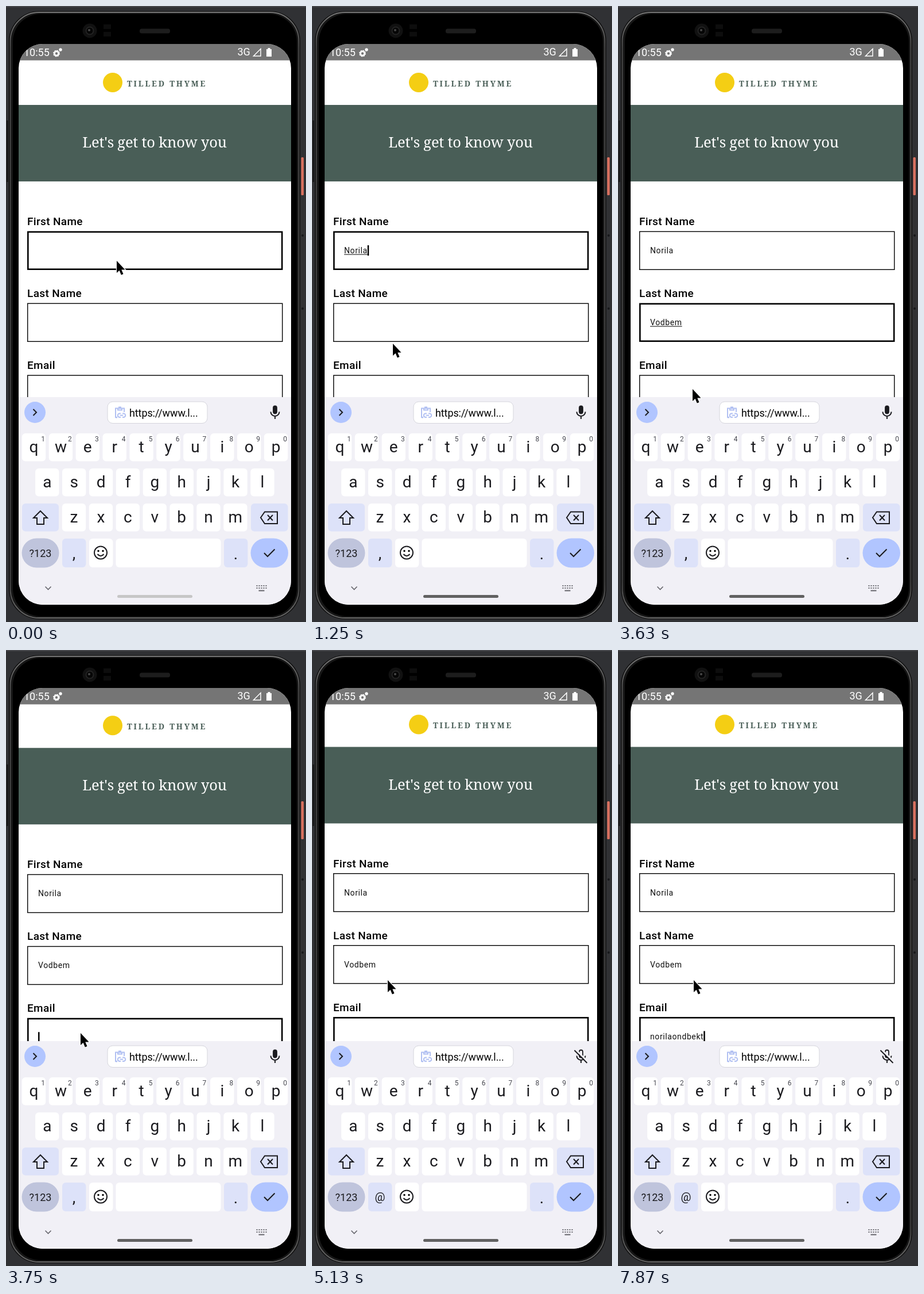
Write an HTML page that moves like this. It is 523 px wide and 1071 px high and loops after 8000 ms.

```html
<!DOCTYPE html>
<html lang="en">
<head>
<meta charset="utf-8">
<title>Sign-up form on a phone</title>
<style>
  html, body { margin: 0; width: 100%; height: 100%; overflow: hidden; background: #303134; }
  svg { display: block; width: 100%; height: 100%; }
  text { font-family: Roboto, sans-serif; white-space: pre; }
  .mid { text-anchor: middle; }
  .serif { font-family: "Noto Serif", serif; }
  .brand { font-size: 13.5px; font-weight: 700; letter-spacing: 2.8px; fill: #495e57; }
  .title { font-size: 25.5px; font-weight: 500; letter-spacing: -.2px; fill: #fff; }
  .label { font-size: 19px; font-weight: 500; letter-spacing: .35px; }
  .value { font-size: 14px; letter-spacing: .6px; fill: #111; }
  .status { font-size: 18px; fill: #fff; }
  .key { font-size: 28px; fill: #1b1b1f; }
  .hint { font-size: 12px; fill: #45464f; }
  .icon { fill: none; stroke: #1b1b1f; stroke-width: 2; }
</style>
</head>
<body>
<svg viewBox="0 0 523 1071">
  <defs>
    <clipPath id="glass"><rect x="22" y="66" width="475" height="975" rx="42"/></clipPath>
    <linearGradient id="rim" x2="0" y2="1">
      <stop stop-color="#777"/><stop offset=".06" stop-color="#4a4a4a"/>
      <stop offset=".94" stop-color="#444"/><stop offset="1" stop-color="#6a6a6a"/>
    </linearGradient>
  </defs>

  <!-- phone body -->
  <path d="M0 1H523" stroke="#45464a" stroke-width="2"/>
  <path d="M2.5 199V306" stroke="#111" stroke-width="2"/>
  <rect x="514.5" y="263" width="4.5" height="66" rx="1.5" fill="#d8705f"/>
  <circle cx="517" cy="399" r="2" fill="#17181a"/><circle cx="517" cy="526" r="2" fill="#17181a"/>
  <rect x="5" y="9" width="508" height="1057" rx="52" fill="#0c0c0c"/>
  <rect x="7.5" y="11" width="503" height="1053" rx="50" fill="#161616" stroke="url(#rim)" stroke-width="2"/>
  <rect x="12" y="14" width="495" height="1047" rx="48"/>
  <circle cx="146" cy="43" r="12.5" fill="#111"/>
  <circle cx="146" cy="43" r="6.5" fill="#060606" stroke="#232323" stroke-width="2"/>
  <circle cx="145" cy="42" r="2" fill="#484848"/>
  <path d="M170 36H183M170 49H183" stroke="#0d0d0d" stroke-width="8"/>
  <rect x="233" y="39.5" width="53" height="8" rx="3.5" fill="#1d1d1d"/>

  <g clip-path="url(#glass)">
    <rect x="22" y="66" width="475" height="975" fill="#fff"/>
    <g id="page">
      <circle cx="186" cy="133" r="17" fill="#f4ce14"/>
      <text class="serif brand" x="211" y="139.5">TILLED THYME</text>
      <rect x="22" y="172" width="475" height="133" fill="#495e57"/>
      <text class="serif title mid" x="259" y="246">Let's get to know you</text>
      <g id="form"></g>
      <rect id="caret" width="2.5" height="18"/>
    </g>

    <!-- status bar -->
    <rect x="22" y="66" width="475" height="28.5" fill="#757575"/>
    <text class="status" x="31" y="87">10:55</text>
    <circle cx="88" cy="82.5" r="3.7" fill="none" stroke="#fff" stroke-width="3"/>
    <circle cx="88" cy="82.5" r="5.2" fill="none" stroke="#fff" stroke-width="1.5" stroke-dasharray="2 2.1"/>
    <circle cx="95" cy="76" r="2.7" fill="#fff"/>
    <text class="status" x="403.5" y="86">3G</text>
    <path d="M431.5 87H444V74.5Z" fill="none" stroke="#fff" stroke-width="1.5"/>
    <path d="M454 75H456.5V73H460.5V75H463V88H454Z" fill="#fff"/>

    <!-- keyboard -->
    <rect x="22" y="680" width="475" height="361" fill="#f1f0f6"/>
    <circle cx="50.5" cy="706.5" r="18.5" fill="#b1c5ff"/>
    <path class="icon" d="M47.5 701L53 706.5 47.5 712"/>
    <rect x="177" y="688" width="174" height="37.5" rx="9" fill="#fff" stroke="#d5d5dc"/>
    <g fill="none" stroke="#b1c0f2" stroke-width="2">
      <path d="M194 715H191V699.5H206V706M194 715.5H191M195 699V702.5H202V699M196 697.5H201"/>
      <path d="M200 708.5H198A3.2 3.2 0 0 0 198 715H200M203 708.5H205A3.2 3.2 0 0 1 205 715H203M199 711.7H204"/>
    </g>
    <text x="215" y="714" font-size="18" letter-spacing="-.1">https://www.l...</text>
    <rect id="mic" x="466" y="695.5" width="6" height="13" rx="3" stroke="#1b1b1f" stroke-width="1.8"/>
    <path class="icon" d="M461.5 705.5A7.5 7.5 0 0 0 476.5 705.5M469 713V718"/>
    <g id="slash">
      <path d="M459 694L480 715" stroke="#f1f0f6" stroke-width="3"/>
      <path class="icon" d="M457.5 696L479.5 718"/>
    </g>
    <g id="keys"></g>
    <path class="icon" d="M60 878L72 890H66V901H54V890H48Z"/>
    <path class="icon" d="M444 889.5L451 879.5H473V900H451ZM456 885L465 894.5M465 885L456 894.5"/>
    <circle class="icon" cx="165" cy="950.5" r="11"/>
    <circle cx="161" cy="947.5" r="1.7"/><circle cx="169" cy="947.5" r="1.7"/>
    <path class="icon" d="M159.5 953Q165 959.5 170.5 953"/>
    <path class="icon" d="M450 951L456 957 468.5 944.5"/>
    <path d="M68.5 1009.5L73.5 1014.5 78.5 1009.5" fill="none" stroke="#66666c" stroke-width="1.6"/>
    <path d="M436.5 1008H455M436.5 1012H455" stroke="#66666c" stroke-width="1.8" stroke-dasharray="2 2"/>
    <path d="M440.5 1016.5H450.5" stroke="#66666c" stroke-width="1.8"/>
    <rect id="handle" x="194" y="1024" width="131" height="5" rx="2.5"/>
  </g>
  <path id="mouse" d="M0 0V21L4.6 16.8 7.8 24.5 11.5 23 8.3 15.500H14.5Z" stroke="#fff" stroke-width="2.2" paint-order="stroke"/>
</svg>
<script>
const $ = id => document.getElementById(id);
const LOOP = 8000, STEP = 125, GAP = 125, LEFT = 56;

// All times below count in steps of 125 ms.
// typed: the step at which each letter appears; lines: spans with an underline
const fields = [
  { label: 'First Name', text: 'Norila', start: 0, typed: [1, 2, 3, 5, 6, 7], lines: [[9, 12]] },
  { label: 'Last Name', text: 'Vodbem', start: 12, typed: [16, 18, 19, 20, 21, 23], lines: [[24, 30]] },
  { label: 'Email', text: 'norilaondbekt', start: 30,
    typed: [42, 44, 45, 47, 48, 50, 55, 57, 58, 60, 62, 62, 63], lines: [[47, 48], [51, 55]] }
];
const caretOff = [[0, 1], [28, 30], [33, 37], [41, 42], [52, 55]];
const moves = [ // from step, to step, x, y
  [0, 0, 193, 443], [7, 10, 141, 587], [11, 13, 133, 558], [26, 28, 130, 666], [36, 40, 132, 574]
];

$('form').innerHTML = fields.map((f, i) => {
  const y = i * GAP;
  return `<text class="label" x="37" y="${y + 381}">${f.label}</text>
    <rect class="box" fill="none" stroke="#000"/>
    <text class="value" x="${LEFT}" y="${y + 430}"></text>
    <rect class="line" x="${LEFT}" y="${y + 431.5}" height="1"/>`;
}).join('');
const [boxes, values, lines] = ['box', 'value', 'line'].map(c => document.getElementsByClassName(c));

const pad = (x, y, w, fill = '#fff', h = 48.5, r = 6) =>
  `<rect x="${x}" y="${y}" width="${w}" height="${h}" rx="${r}" fill="${fill}"/>`;
const glyph = (x, y, s, cls = 'key', more = '') =>
  `<text class="mid ${cls}" x="${x}" y="${y}" ${more}>${s}</text>`;
const row = (letters, x, y, hints = '') => [...letters].map((c, i) => {
  const cx = x + i * 46.9;
  return pad(cx - 20.7, y, 41.4) + glyph(cx, y + 33, c) +
    (hints ? glyph(cx + 16, y + 13.5, hints[i], 'hint') : '');
}).join('');
const pale = '#dde2f9';
$('keys').innerHTML =
  row('qwertyuiop', 48.5, 743, '1234567890') + row('asdfghjkl', 71.8, 804) + row('zxcvbnm', 118.5, 865) +
  pad(28, 865, 64, pale) + pad(427, 865, 64.5, pale) +
  pad(27.5, 925.5, 65, '#bfc4dc', 51, 25.5) + pad(98, 926, 41.4, pale, 50) + pad(145, 926, 41.4, '#fff', 50) +
  pad(191.5, 926, 183, '#fff', 50) + pad(380, 926, 41.4, pale, 50) + pad(426.5, 925.5, 65.5, '#b1c5ff', 51, 25.5) +
  glyph(60, 958, '?123', 'hint', 'style="font-size:18px;fill:#1b1b1f"') +
  glyph(118.5, 961, ',', 'key', 'id="comma"') +
  glyph(118.5, 958, '@', 'key', 'id="at" style="font-size:20px"') + glyph(400.5, 962, '.');

const within = (n, spans) => spans.some(([a, b]) => n >= a && n < b);
const clamp = v => Math.min(1, Math.max(0, v));
const show = (el, on) => el.style.display = on ? '' : 'none';
const set = (el, attrs) => Object.entries(attrs).forEach(([k, v]) => el.setAttribute(k, v));

function draw(ms) {
  const n = Math.floor((ms + 5) % LOOP / STEP);
  const active = fields.findLastIndex(f => n >= f.start);
  fields.forEach((f, i) => {
    values[i].textContent = f.text.slice(0, f.typed.filter(s => s <= n).length);
    const width = values[i].textContent ? values[i].getComputedTextLength() : 0;
    set(lines[i], { width });
    show(lines[i], within(n, f.lines));
    // the border grows inwards
    const b = i === active ? 2.6 : 1.4;
    set(boxes[i], {
      x: 37 + b / 2, y: 391.5 + i * GAP + b / 2, width: 445.5 - b, height: 67.5 - b, 'stroke-width': b
    });
    if (i === active) set($('caret'), { x: LEFT + width, y: 416 + i * GAP });
  });
  show($('caret'), !within(n, caretOff));

  const email = n >= 31;
  show($('slash'), email);
  show($('at'), email);
  show($('comma'), !email);
  set($('mic'), { fill: email ? 'none' : '#1b1b1f' });
  set($('page'), { transform: `translate(0 ${-3.5 * clamp((n - 29) / 2)})` });

  let x = 0, y = 0;
  for (const [from, to, mx, my] of moves) {
    const p = from === to ? 1 : clamp((n - from) / (to - from)), k = p * p * (3 - 2 * p);
    x += (mx - x) * k;
    y += (my - y) * k;
  }
  set($('mouse'), { transform: `translate(${x} ${y})` });

  const shade = 198 - 101 * clamp(n / 5);
  set($('handle'), { fill: `rgb(${shade},${shade},${shade})` });
}

const begin = performance.now();
(function tick() {
  draw((performance.now() - begin) % LOOP);
  requestAnimationFrame(tick);
})();
</script>
</body>
</html>
```
